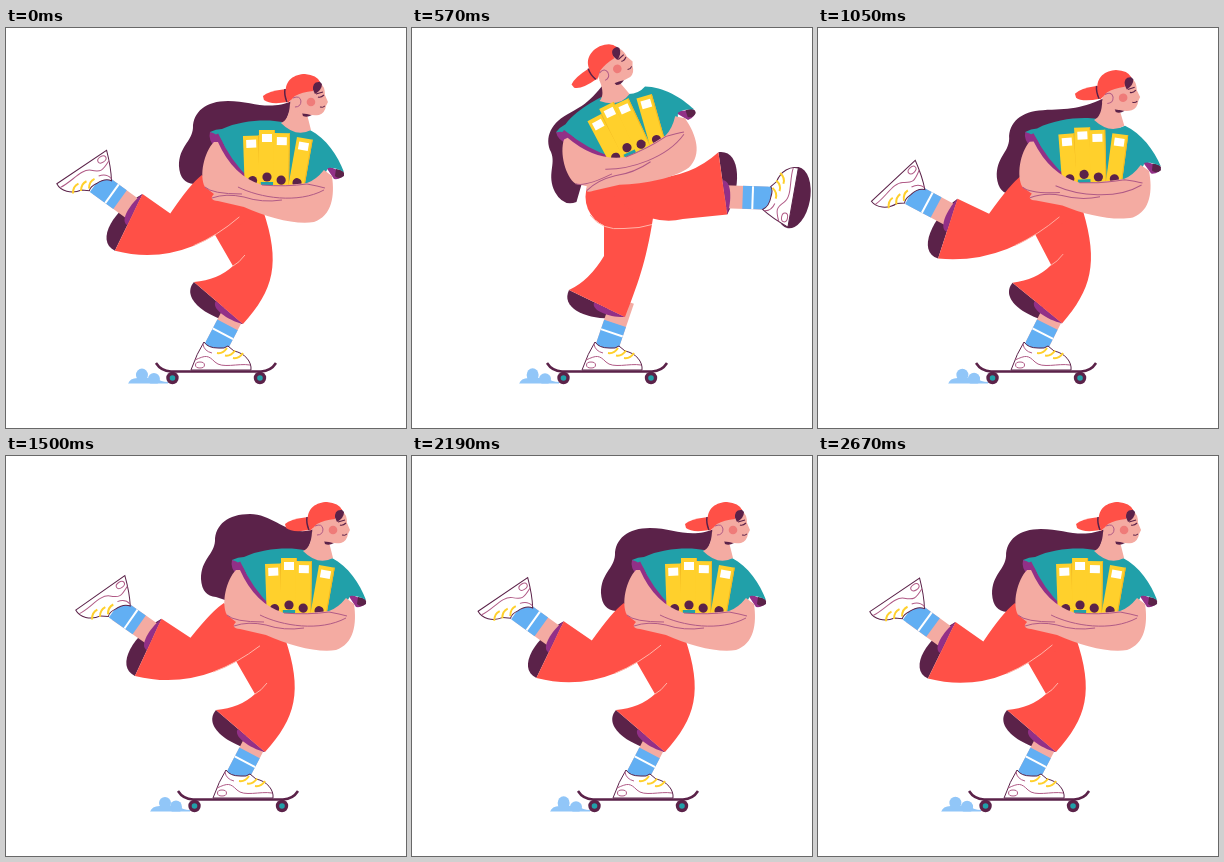
An HTML page with a canvas that plays this animation: 400 px wide and 400 px high, repeating every 2700 ms.

```html
<!DOCTYPE html>
<html lang="en">
<head>
<meta charset="utf-8">
<title>Skater</title>
<style>
html, body { margin: 0; width: 100%; height: 100%; overflow: hidden; background: #fff; }
canvas { display: block; width: 400px; height: 400px; }
</style>
</head>
<body>
<canvas id="stage"></canvas>
<script>
const LOOP = 2700;
const RED = '#ff5047', SKIN = '#f4aba2', DARK = '#5b2249', PURPLE = '#923087', TEAL = '#21a0a9',
  YELLOW = '#ffd02c', SOCK = '#62aff3', PUFF = '#91c6f8', LINE = '#b05a86', CREASE = '#ffb5a9';

const canvas = document.getElementById('stage');
const ctx = canvas.getContext('2d');
const ratio = Math.max(1, window.devicePixelRatio || 1);
canvas.width = canvas.height = 400 * ratio;

// Smooth periodic curve through a few [time, value] keys, without overshoot.
function track(...keys) {
  const n = keys.length;
  const key = i => {
    const [t, v] = keys[(i + n) % n];
    return [t + Math.floor(i / n) * LOOP, v];
  };
  const slope = i => (key(i + 1)[1] - key(i)[1]) / (key(i + 1)[0] - key(i)[0]);
  const tangent = i => {
    const a = slope(i - 1), b = slope(i);
    return a * b <= 0 ? 0 : 2 * a * b / (a + b);
  };
  return time => {
    let k = n - 1;
    while (keys[k][0] > time) k--;
    const [t0, a] = key(k), [t1, b] = key(k + 1);
    const span = t1 - t0, s = (time - t0) / span;
    return a + (b - a) * s * s * (3 - 2 * s) +
      span * s * (1 - s) * ((1 - s) * tangent(k) - s * tangent(k + 1));
  };
}

// Single soft swell around a moment.
function swell(time, peak, rise, fall) {
  const u = (time - peak) / (time < peak ? rise : fall);
  return Math.abs(u) < 1 ? Math.cos(u * Math.PI / 2) ** 2 : 0;
}

const glide = track([0, 150], [240, 140], [570, 135], [1050, 158], [1500, 172], [2190, 166]);
const hairDrop = track([0, 0], [570, 16], [1050, 10], [1500, -15], [2190, -1]);
// Leg directions in degrees: 0 points ahead, 90 down, 180 back.
const thighAngle = track([0, 146], [240, 119], [570, 3], [770, 72], [900, 115], [1050, 146], [1500, 150], [2190, 147]);
const calfAngle = track([0, 206], [110, 198], [240, 172], [570, -8], [770, 82], [900, 146], [1050, 198], [1500, 205]);

const rad = degrees => degrees * Math.PI / 180;
const mix = (a, b, s) => a.map((v, i) => v + (b[i] - v) * s);
// Step from a point along a direction, and sideways towards the front of the leg.
const step = ([x, y], degrees, along, front = 0) => {
  const c = Math.cos(rad(degrees)), s = Math.sin(rad(degrees));
  return [x + c * along + s * front, y + s * along - c * front];
};

function fill(path, color) {
  ctx.fillStyle = color;
  ctx.fill(new Path2D(path));
}
function stroke(path, color, width = 1) {
  ctx.strokeStyle = color;
  ctx.lineWidth = width;
  ctx.stroke(new Path2D(path));
}
function oval(x, y, rx, ry, color) {
  ctx.fillStyle = color;
  ctx.beginPath();
  ctx.ellipse(x, y, rx, ry, 0, 0, 7);
  ctx.fill();
}
function placed(x, y, degrees, draw) {
  ctx.save();
  ctx.translate(x, y);
  ctx.rotate(rad(degrees));
  draw();
  ctx.restore();
}
function faded(alpha, draw) {
  ctx.globalAlpha = alpha;
  draw();
  ctx.globalAlpha = 1;
}

function drawPuff(x, time) {
  const wobble = Math.sin(time / LOOP * Math.PI * 10);
  ctx.save();
  ctx.beginPath();
  ctx.rect(0, 0, 400, 355.5);
  ctx.clip();
  oval(x - 14 - wobble, 347, 6, 6.5 + wobble * .6, PUFF);
  oval(x - 2, 351, 6, 6 - wobble * .6, PUFF);
  fill(`M${x - 28} 356Q${x - 26} 349 ${x - 16} 350L${x} 350Q${x + 5} 354 ${x + 12} 354V356Z`, PUFF);
  ctx.restore();
}

function drawBoard(x) {
  stroke(`M${x} 335Q${x + 5} 343 ${x + 15} 343.5H${x + 105}Q${x + 115} 343 ${x + 120} 335`, DARK, 2.5);
  for (const wheel of [x + 16.5, x + 104]) {
    oval(wheel, 350, 6.2, 6.2, DARK);
    oval(wheel, 350, 2.8, 2.8, TEAL);
  }
}

function drawShoe(x, y, degrees, sole) {
  placed(x, y, degrees, () => {
    if (sole > .01) oval(5, 25, 31, 17 * sole, DARK);
    const body = 'M-25 25Q-19 8 -12 -3Q-8 3 2 3Q9 4 12 1L18 6C29 8 36 17 35 25Z';
    fill(body, '#fff');
    stroke(body, DARK);
    stroke('M-21 15C-10 10 -8 10 -1 17S22 18 34 20M-13 -1Q-12 6 -4 8', LINE);
    ctx.beginPath();
    ctx.ellipse(-16, 20, 4.5, 3, 0, 0, 7);
    ctx.stroke();
    for (let i = 0; i < 3; i++) stroke(`M${1 + 8 * i} ${8 + 2.5 * i}q6 1 10 -5`, YELLOW, 2);
  });
}

function drawShin(top, ankle) {
  const length = Math.hypot(top[0] - ankle[0], top[1] - ankle[1]);
  const band = (from, to, color) =>
    stroke(`M${mix(ankle, top, from / length)}L${mix(ankle, top, to / length)}`, color, 23);
  band(0, length, SKIN);
  band(-4, 25, SOCK);
  band(14, 16, '#fff');
}

// Half-moon opening of a trouser leg, bulging to one side of the line a-b.
function drawOpening(a, b, side, depth, color) {
  const d = Math.hypot(b[0] - a[0], b[1] - a[1]);
  const nx = -(b[1] - a[1]) / d * side * depth, ny = (b[0] - a[0]) / d * side * depth;
  const [mx, my] = mix(a, b, .6);
  fill(`M${a}C${a[0] + nx} ${a[1] + ny} ${mx + nx * .8} ${my + ny * .8} ${b}Z`, color);
}

function drawCuff(far, near, side, shin) {
  drawOpening(far, near, side, 23, DARK);
  shin();
  drawOpening(mix(far, near, .45), near, side, 9, PURPLE);
}

function drawStandingLeg(x, kick) {
  const between = (bent, tall) => mix(bent, tall, kick).map((v, i) => i ? v : v + x);
  const crotch = between([58, 205], [57, 195]);
  const inner = between([77, 238], [57, 228]);
  const bend = between([62, 252], [42, 253]);
  const left = between([38, 254], [22, 262]);
  const right = between([87, 296], [78, 289]);
  const calf = between([118, 262], [90, 258]);
  const knee = between([125, 235], [99, 235]);
  const hip = between([107, 182], [106, 190]);
  drawCuff(left, right, 1, () => drawShin(between([83, 275], [76, 272]), [x + 60, 319]));
  drawShoe(x + 60, 317, 0, 0);
  fill(`M${x + 62} 165L${crotch}L${inner}Q${bend} ${left}L${right}C${calf} ${knee} ${hip}Z`, RED);
  faded(1 - kick, () => stroke(`M${inner}q6 -3 12 -11`, CREASE));
}

function drawPushingLeg(x, time, kick) {
  const thigh = thighAngle(time), calf = calfAngle(time);
  const reach = 1 + .15 * swell(time, 780, 200, 200);
  const hip = [x + 70, 169];
  const knee = step(hip, thigh, 63 * reach);
  const cuff = step(knee, calf - 13, 46 * reach);
  const shin = step(cuff, calf, 0, -13);
  const ankle = step(shin, calf + 10, 43 * reach);
  const kneeTurn = (thigh + calf - 13) / 2;

  const front = step(cuff, calf, 0, 32), back = step(cuff, calf, 0, -31);
  const kneeBack = step(knee, kneeTurn, 0, -19);
  const kneeFront = step(knee, kneeTurn, 0, 36 - 24 * kick);
  const seatCurve = step(hip, thigh, 22, -31), groin = step(hip, thigh, 0, 24);

  drawCuff(front, back, -1, () => drawShin(shin, ankle));
  drawShoe(...ankle, calf - 60 - 12 * kick, kick ** 2);
  oval(...hip, 31.5, 31.5, RED);
  fill(`M${hip[0] - 24} 147Q${seatCurve} ${kneeBack}L${back}L${front}Q${kneeFront} ${groin}Z`, RED);

  const bend = mix(kneeFront, groin, .62), start = mix(mix(front, kneeFront, .62), bend, .62);
  faded(1 - kick, () => stroke(`M${start}Q${bend} ${groin}`, CREASE));
  faded(kick ** 3, () => stroke(`M${hip[0] - 27} 187q12 16 34 13.5q16 0 28 -4`, CREASE));
}

function drawHair(toStage, kick, drop) {
  const at = (x, y) => {
    const [px, py] = toStage(x, y);
    return [px + 12 * kick, py + drop];
  };
  fill(`M${toStage(288, 72)}C${toStage(262, 84)} ${at(247, 73)} ${at(222, 73)}` +
    `C${at(200, 73)} ${at(187, 84)} ${at(187, 100)}C${at(186, 114)} ${at(173, 118)} ${at(173, 138)}` +
    `Q${at(174, 155)} ${at(188, 156)}L${toStage(215, 150)}L${toStage(278, 98)}Z`, DARK);
}

function drawFolder(x, y, height, tilt) {
  placed(x, y, tilt, () => {
    ctx.fillStyle = YELLOW;
    ctx.fillRect(0, 0, 16, height);
    stroke(`M15.5 0V${height}`, '#f2b722');
    ctx.fillStyle = '#fff';
    ctx.fillRect(3, 4, 10, 8);
    oval(8, height - 5, 4.6, 4.6, DARK);
  });
}

function drawHead() {
  fill('M284 76Q283 92 275 95Q290 110 305 102L301 86Z', SKIN);
  fill('M295 81Q302 82 306 87Q301 90 297 88Z', DARK);
  fill('M285 64L284 78Q291 86 301 86Q307 88 313 87Q319 85 320 78L322 74L319 67Q319 58 314 55L295 56Z', SKIN);
  fill('M306 55Q312 50 316 56Q316 62 309 66Q306 61 306 55Z', DARK);
  fill('M280 66C278 52 289 46 299 46Q311 47 314 54Q306 53 307 63Q296 64 289 68L282 75Z', RED);
  fill('M257 68Q262 63 280 61L282 74Q264 77 258 72Z', RED);
  stroke('M279 61Q278 67 281 74', DARK, 1.5);
  oval(305, 74, 4.3, 4.3, '#ef7b79');
  stroke('M287 70Q294 67 295 73Q295 79 289 79', LINE);
  stroke('M312 69Q315 70 318 67M310 66L317 64', DARK, 1.2);
  stroke('M314 79Q317 80 319 78', DARK);
}

function drawTorso(lean) {
  fill('M204 104Q202 112 209 119L222 114L212 104ZM318 136L328 151Q336 152 338 145Z', PURPLE);
  fill('M330 141Q340 142 338 148Q333 152 329 148Z', DARK);
  fill('M216 101C235 92 262 91 276 94Q290 108 304 102C320 110 332 128 338 144' +
    'Q328 139 322 140L312 160H235L216 113Q212 106 204 104Q210 101 216 101Z', TEAL);
  stroke('M209 107Q222 136 242 154', PURPLE, 7);
  placed(lean * .7, 0, 0, drawHead);
  drawFolder(237, 108, 50, -2);
  drawFolder(253, 102, 52, 0);
  drawFolder(268, 105, 52, 1);
  drawFolder(291, 109, 50, 10);
  fill('M208 114C198 124 193 148 199 159L208 166Q202 172 212 173L238 179C262 190 290 197 308 194' +
    'C326 188 329 168 326 148L318 142Q310 152 301 155Q275 158 256 157Q227 148 212 114Z', SKIN);
  stroke('M199 159Q206 166 236 166M232 159C254 170 292 176 318 162' +
    'M206 170Q220 165 238 169Q256 175 276 172M256 157Q280 159 301 156Q312 158 319 160', LINE);
}

function draw(time) {
  const kick = swell(time, 570, 430, 600);
  const board = glide(time);
  const chest = [board + 120 - 42 * kick, 126 - 31 * kick];
  const lean = -26 * kick;
  const toStage = (x, y) => step(chest, lean, x - 270, 126 - y);

  ctx.setTransform(ratio, 0, 0, ratio, 0, 0);
  ctx.fillStyle = '#fff';
  ctx.fillRect(0, 0, 400, 400);
  drawPuff(board, time);
  drawBoard(board);
  drawHair(toStage, kick, hairDrop(time));
  drawStandingLeg(board, kick);
  drawPushingLeg(board, time, kick);
  placed(...chest, lean, () => {
    ctx.translate(-270, -126);
    drawTorso(lean);
  });
}

const begin = performance.now();
function tick() {
  draw((performance.now() - begin) % LOOP);
  requestAnimationFrame(tick);
}
tick();
</script>
</body>
</html>
```
